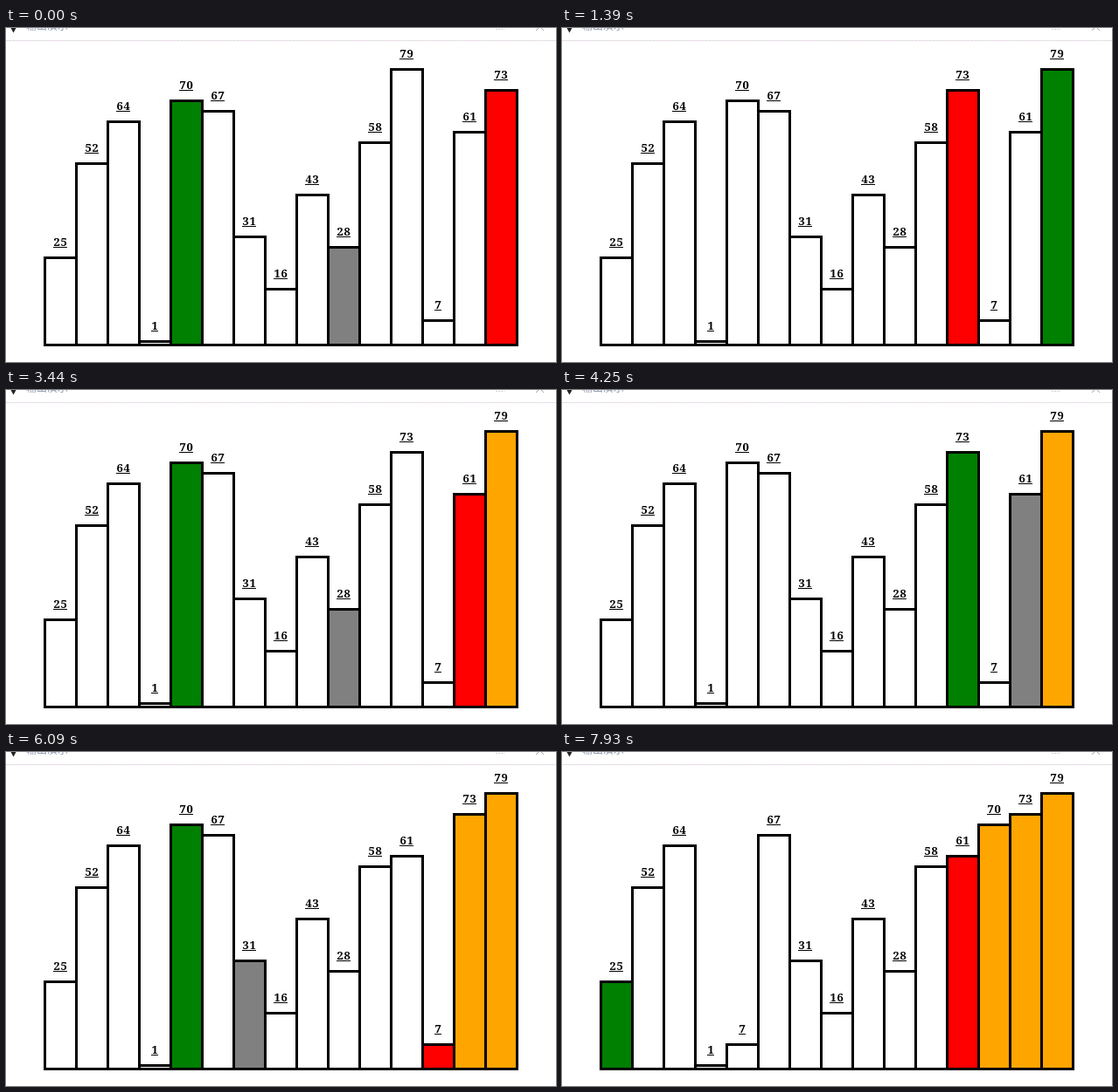
Animation, 629 px wide and 383 px high, one loop 8000 ms. Source, as an HTML page with a canvas:

```html
<!DOCTYPE html>
<html lang="zh">
<head>
<meta charset="utf-8">
<style>
  html, body { margin: 0; width: 100%; height: 100%; overflow: hidden; background: #fff; }
  canvas { display: block; }
</style>
</head>
<body>
<canvas id="stage" width="629" height="383"></canvas>
<script>
const ctx = document.getElementById('stage').getContext('2d');
const LOOP = 8000, HOLD = 360, STEP = 204.3;
const LEFT = 44.5, BASE = 363.5, BAR = 36, UNIT = 4;
const COLORS = { max: '#008000', end: '#ff0000', scan: '#808080', done: '#ffa500' };
const START = [25, 52, 64, 1, 70, 67, 31, 16, 43, 28, 58, 79, 7, 61, 73];

// Selection sort that moves the largest value to the end on each pass.
function* sortSteps(values, max, first) {
  for (let end = values.length - 1; end > 0; end--) {
    const state = marks => ({ values: [...values], max, end, scan: -1, done: end + 1, ...marks });
    for (let scan = first; scan <= end; scan++) {
      if (values[scan] > values[max]) max = scan;
      yield state({ scan });
    }
    yield state();
    [values[max], values[end]] = [values[end], values[max]];
    yield state({ max: end, end: max });
    max = first = 0;
  }
}

const steps = [...sortSteps([...START], 4, 9)];

// The opening hold covers two steps, then the pace is even.
function stepAt(time) {
  return time < HOLD ? 0 : 2 + Math.floor((time - HOLD) / STEP);
}

function fillOf(step, i) {
  if (i === step.max) return COLORS.max;
  if (i === step.scan) return COLORS.scan;
  if (i === step.end) return COLORS.end;
  return i >= step.done ? COLORS.done : '#fff';
}

function line(color, x1, y1, x2, y2, dash = [], offset = 0) {
  ctx.strokeStyle = color;
  ctx.lineWidth = 1;
  ctx.setLineDash(dash);
  ctx.lineDashOffset = offset;
  ctx.beginPath();
  ctx.moveTo(x1, y1);
  ctx.lineTo(x2, y2);
  ctx.stroke();
  ctx.setLineDash([]);
}

function drawHeader() {
  ctx.fillStyle = '#222';
  ctx.beginPath();
  ctx.moveTo(5.5, 0);
  ctx.lineTo(11.5, 0);
  ctx.lineTo(8.5, 5.5);
  ctx.fill();

  ctx.font = '12px "Noto Sans CJK SC", "Noto Sans CJK", sans-serif';
  ctx.letterSpacing = '0px';
  ctx.fillStyle = '#8e99ac';
  ctx.fillText('输出演示', 23, 2);

  line('#d0d4d8', 560, 1.5, 570, 1.5, [2, 1]);
  line('#a4a8ac', 609, 0, 606, 3);
  line('#a4a8ac', 612, 0, 615, 3);
  line('#f5cdf5', 0, 14.5, 629, 14.5, [2, 2]);
  line('#d8f0d8', 0, 14.5, 629, 14.5, [2, 2], 2);
}

function drawBar(value, i, fill) {
  const x = LEFT + i * BAR, height = value * UNIT, top = BASE - height;
  ctx.fillStyle = fill;
  ctx.fillRect(x, top, BAR, height);
  ctx.strokeStyle = '#000';
  ctx.lineWidth = 3;
  ctx.strokeRect(x, top, BAR, height);

  const label = String(value), width = label.length * 8;
  const labelX = x + 17.5 - width / 2;
  ctx.font = 'bold 13px "Noto Serif", serif';
  ctx.letterSpacing = '0.7px';
  ctx.fillStyle = '#000';
  ctx.fillText(label, labelX + 0.6, top - 13.5);
  ctx.fillRect(labelX, top - 12.5, width, 1);
}

function draw(step) {
  ctx.fillStyle = '#fff';
  ctx.fillRect(0, 0, 629, 383);
  drawHeader();
  step.values.forEach((value, i) => drawBar(value, i, fillOf(step, i)));
}

const begin = performance.now();
let shown = -1;

function tick() {
  const index = stepAt((performance.now() - begin) % LOOP);
  if (index !== shown) draw(steps[shown = index]);
  requestAnimationFrame(tick);
}
tick();
</script>
</body>
</html>
```
